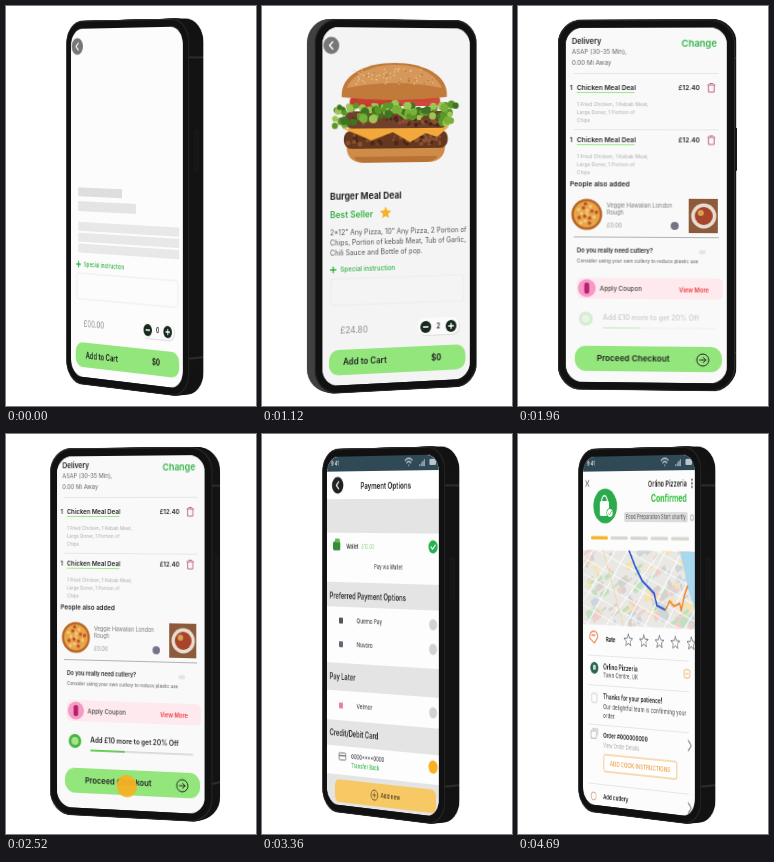
These frames come from a looping animation (250x400 px, 4760 ms). An HTML page:

```html
<!DOCTYPE html>
<html lang="en">
<head>
<meta charset="utf-8">
<title>Food ordering phone</title>
<style>
html, body { margin: 0; width: 100%; height: 100%; overflow: hidden; background: #fff; }
#stage { position: relative; width: 250px; height: 400px; overflow: hidden; perspective: 2600px; perspective-origin: 129px 75px; }
#phone { position: absolute; left: 40.5px; top: 14px; width: 177px; height: 369px; transform-style: preserve-3d; }
.slice, .key { position: absolute; }
.slice { inset: 0; border-radius: 24px; background:
  linear-gradient(#2c2c2c, #2c2c2c) right 37px / 6px 2px no-repeat,
  linear-gradient(#2c2c2c, #2c2c2c) right 330px / 6px 2px no-repeat,
  linear-gradient(90deg, #404040 8%, #121212 92%); }
.slice.front { background: #111; box-shadow: inset 0 0 0 1px #2c2c2c; }
.key { right: -1px; top: 108px; width: 4px; height: 42px; background: #161616; }
#screen { position: absolute; left: 8px; top: 8px; width: 161px; height: 353px; border-radius: 17px; overflow: hidden; background: #fcfcfc; transform: translateZ(13.6px); }
svg { display: block; font-family: Inter, sans-serif; }
</style>
</head>
<body>
<div id="stage"><div id="phone"></div></div>
<script>
const LOOP = 4760, STEP = 70;
const GREEN = '#2fb344', LIME = '#92e67b', ORANGE = '#f9b022', GREY = '#9a9a9a', INK = '#242424';

// Text is placed by its vertical centre.
const text = (x, y, size, s, fill = INK, weight = 400, anchor = 'start', id = '') =>
  `<text id="${id}" x="${x}" y="${y + size * .35}" font-size="${size}" fill="${fill}" font-weight="${weight}" text-anchor="${anchor}">${s}</text>`;
const rect = (x, y, w, h, fill, r = 0, more = '') =>
  `<rect x="${x}" y="${y}" width="${w}" height="${h}" rx="${r}" fill="${fill}" ${more}/>`;
const disc = (x, y, r, fill, more = '') => `<circle cx="${x}" cy="${y}" r="${r}" fill="${fill}" ${more}/>`;
const shape = (d, fill) => `<path d="${d}" fill="${fill}"/>`;
const line = (d, stroke, w = 1) =>
  `<path d="${d}" fill="none" stroke="${stroke}" stroke-width="${w}" stroke-linecap="round" stroke-linejoin="round"/>`;
const rule = (y, x = 8, w = 145) => rect(x, y, w, .8, '#e2e2e2');
const plus = (x, y, r, color, w = 1) => line(`M${x - r} ${y}h${2 * r}M${x} ${y - r}v${2 * r}`, color, w);
const group = (id, body) => `<g id="${id}">${body}</g>`;
const each = (n, f) => Array.from({ length: n }, (_, i) => f(i)).join('');

function star(x, y, r) {
  return 'M' + Array.from({ length: 10 }, (_, i) => {
    const a = i * Math.PI / 5, d = i % 2 ? r * .45 : r;
    return `${(x + d * Math.sin(a)).toFixed(1)} ${(y - d * Math.cos(a)).toFixed(1)}`;
  }).join('L') + 'Z';
}

let seed = 7;
const rnd = () => (seed = seed * 16807 % 2147483647) / 2147483647;

function backButton(x, y, r, fill) {
  return disc(x, y, r, fill) + line(`M${x + 1.5} ${y - 3.5}l-3.5 3.5l3.5 3.5`, '#fff', 1.5);
}

function burger() {
  const greens = ['#5d9628', '#79b038', '#3f7420', '#9cc653'];
  const crumbs = (y, n) => each(n, () => disc(30 + rnd() * 99, y + rnd() * 10, 1 + rnd() * 1.5, rnd() < .5 ? '#8a5232' : '#4b2618'));
  const leaves = each(90, i => {
    const x = 17 + rnd() * 125, side = Math.abs(x - 79) / 62;
    return disc(x, 76 + rnd() * (10 + 13 * side), 2.5 + rnd() * 2, greens[i % 4]);
  });
  return '<g transform="translate(-4.700 0) scale(1.060 1)">' +
    shape('M29 114H130Q132 134 112 134H47Q27 134 29 114Z', '#cf8c48') +
    shape('M36 128H123Q118 134 110 134H48Q40 134 36 128Z', '#b87234') +
    rect(26, 102, 107, 18, '#66371f', 8) + crumbs(106, 50) +
    shape('M25 100L134 99L122 109L110 105L94 114L76 104L54 112L40 106Z', '#f2a93a') +
    rect(27, 83, 106, 17, '#70402a', 7) + crumbs(87, 50) +
    rect(32, 69, 46, 10, '#c43a2c', 4) + rect(80, 68, 45, 10, '#d2483a', 4) + leaves +
    rect(40, 70, 30, 5, '#c93e30', 2) + rect(84, 69, 34, 5, '#d04536', 2) +
    shape('M24 69C22 48 46 35 78 35S134 48 132 69Q78 75 24 69Z', '#c27a3a') +
    shape('M29 60C36 44 58 37 78 37S118 42 127 60Q78 50 29 60Z', '#d6985a') +
    each(70, () => disc(36 + rnd() * 84, 41 + rnd() * 16, .7, rnd() < .7 ? '#eccf9c' : '#b06f34')) + '</g>';
}

function product() {
  const details = rect(0, 0, 161, 353, '#f4f4f4') + burger() +
    text(8, 167, 9.3, 'Burger Meal Deal', INK, 700) +
    text(8, 185, 9, 'Best Seller', GREEN, 600) +
    shape(star(68, 184, 6.5), ORANGE) +
    ['2*12" Any Pizza, 10" Any Pizza, 2 Portion of', 'Chips, Portion of kebab Meat, Tub of Garlic,', 'Chili Sauce and Bottle of pop.']
      .map((s, i) => text(8, 202.500 + i * 10, 7.2, s, '#555')).join('');
  const skeleton = rect(11, 161, 64, 9, '#dedede') + rect(11, 175, 84, 10, '#e4e4e4') +
    each(3, i => rect(11, 196 + i * 11, 145, 9, '#e8e8e8'));
  return group('details', details) + group('skeleton', skeleton) + backButton(9.5, 18, 8.5, '#777') +
    plus(11.5, 239, 2.8, GREEN, 1.4) + text(19, 239, 6.7, 'Special instruction', GREEN, 500) +
    rect(9, 248, 145, 26, 'none', 2, 'stroke="#ebebeb"') +
    text(19, 298.500, 8.8, '', GREY, 500, 'start', 'price') +
    rect(104, 291, 46, 17, '#dedede', 8) + rect(103, 290, 46, 17, '#fbfbfb', 8) +
    disc(112, 299, 6, '#16291c') + line('M109.500 299h5', '#fff', 1.3) +
    disc(140, 299, 6, '#16291c') + plus(140, 299, 2.6, '#fff', 1.3) +
    text(126, 299, 7, '', INK, 600, 'middle', 'count') +
    rect(7, 318, 149, 25, LIME, 10) + text(22, 330.500, 8.6, 'Add to Cart', INK, 600) + text(118, 330.500, 8.4, '$0', INK, 700);
}

function basketItem(y) {
  return text(4, y, 6.4, '1', INK, 600) + text(11, y, 6.6, 'Chicken Meal Deal', INK, 600) +
    rect(11, y + 4, 58, .9, LIME) + text(134, y, 6.4, '£12.40', INK, 600, 'end') +
    line(`M142 ${y - 3}h7M144 ${y - 4.500}h3M142.700 ${y - 3}v7h5.600v-7`, '#c4667c') +
    ['1 Fried Chicken, 1 Kebab Meat,', 'Large Doner, 1 Portion of', 'Chips'].map((s, i) => text(11, y + 16 + i * 8, 5, s, '#aaa')).join('');
}

function basket() {
  const pizza = disc(21, 186, 15.5, '#b86526') + disc(21, 186, 13, '#e6a548') +
    each(16, i => disc(21 + 11 * Math.cos(i * 2.4) * Math.sqrt(i / 16), 186 + 11 * Math.sin(i * 2.4) * Math.sqrt(i / 16), 1.8, i % 2 ? '#c4512a' : '#f0c878'));
  const bowl = rect(123, 170, 29, 34, '#8d5a3c') + disc(138, 187, 12.5, '#e6ded2') + disc(138, 187, 9, '#a8442c') + disc(135, 184, 3, '#d8a150');
  return rect(0, 0, 161, 360, '#f9f9f9') +
    text(6, 13, 7.4, 'Delivery', INK, 600) + text(6, 24, 6.2, 'ASAP (30-35 Min),', '#666') + text(6, 35, 6.2, '0.00 Mi Away', '#666') +
    text(151, 16, 9.4, 'Change', GREEN, 600, 'end') + rule(45) +
    basketItem(60) + rule(101) + basketItem(112) +
    text(4, 156, 6.8, 'People also added', INK, 600) + pizza + bowl +
    text(41, 177, 5.6, 'Veggie Hawaiian London', '#777') + text(41, 184.500, 5.6, 'Rough', '#777') + text(41, 197, 5.6, '£0.00', GREY) +
    disc(109, 197, 4, '#737487') + rect(8, 208, 145, .9, '#aaa') +
    text(11, 222, 5.8, 'Do you really need cutlery?', INK, 600) + rect(133, 221, 7, 4, '#e4e4e4', 2) +
    text(11, 232, 4.8, 'Consider using your own cutlery to reduce plastic use', '#555') +
    rect(11, 249, 146, 21, '#fde9ee', 5) + disc(21, 259.500, 9, '#f59ac4') + rect(18.500, 254, 5, 11, '#b8206c', 2) +
    text(34, 259.500, 6.2, 'Apply Coupon', '#444', 500) + text(143, 260.500, 5.8, 'View More', '#ec3b3b', 600, 'end') +
    group('offer', disc(20, 290, 7, '#48b53c') + disc(20, 290, 4, '#a6e292') +
      text(37, 289, 6.9, 'Add £10 more to get 20% Off', INK, 600) + rect(37, 298, 112, 1.8, '#d8d8d8', 1) + rect(37, 298, 38, 1.8, '#5cc94a', 1)) +
    rect(9, 317, 147, 25, LIME, 11) + text(31, 329.500, 8.2, 'Proceed Checkout', INK, 600) +
    disc(137, 330, 6, 'none', `stroke="${INK}"`) + line('M134 330h6m-2.500 -2.500l2.500 2.500l-2.500 2.500', INK);
}

function statusBar() {
  return rect(0, 0, 161, 15, '#304957') + text(6, 7, 6, '9:41', '#fff', 500) +
    line('M114 5q5 -4 10 0M116 7.500q3 -2.500 6 0M118.800 10h.4', '#b9c6ce', 1.3) +
    each(4, i => rect(134 + i * 2.2, 9 - i * 1.6, 1.3, 2 + i * 1.6, '#b9c6ce')) + rect(148, 4, 9, 6, '#b9c6ce', 1.5);
}

function method(y, name, mark) {
  return rect(18, y - 3, 6, 6, mark, 1) + text(44, y, 6.8, name, '#444', 500) + disc(153, y, 5.500, '#d2d2d2');
}

function payment() {
  const head = (y, s) => text(4, y, 8.500, s, '#333', 600);
  return rect(0, 0, 161, 353, '#e4e4e4') + rect(0, 0, 161, 43, '#fff') + statusBar() +
    backButton(16, 29, 8.5, '#222') + text(86, 30, 8.800, 'Payment Options', INK, 600, 'middle') +
    rect(0, 77, 161, 50, '#fdfdfd') + rect(9, 86, 11, 9, '#348d37', 2) + rect(12, 83, 7, 4, '#62b84c', 1) +
    text(29, 90.500, 6, 'Wallet', INK, 500) + text(51, 90.500, 6, '£10.00', '#8bd97a') +
    disc(153, 90, 6.5, '#26b153') + line('M150 90l2.200 2.200l4 -4', '#fff', 1.3) + text(90, 111, 6.1, 'Pay via Wallet', '#444', 500, 'middle') +
    head(141, 'Preferred Payment Options') + rect(0, 152, 161, 57, '#fdfdfd') +
    method(166, 'Quemo Pay', '#555') + method(190, 'Nuvoro', '#667') +
    head(223, 'Pay Later') + rect(0, 237, 161, 30, '#fdfdfd') + method(252, 'Velmor', '#ef7fa0') +
    head(280, 'Credit/Debit Card') + rect(0, 293, 161, 29, '#fdfdfd') +
    rect(18, 300, 10, 7, 'none', 1, 'stroke="#777"') + rect(18, 302, 10, 1.4, '#777') +
    text(36, 303, 6.2, '0000****0000', '#444', 500) + text(36, 312, 6.2, 'Transfer Back', GREEN, 500) + disc(153, 305, 6.5, ORANGE) +
    rect(12, 327, 145, 23, '#f7c965', 6) + disc(70, 339, 5, 'none', 'stroke="#6b5525"') + plus(70, 339, 2.4, '#6b5525') +
    text(79, 339, 6.6, 'Add new', '#453617', 500);
}

function map() {
  const tints = ['#efcfca', '#c4dfc0', '#f3e4b0', '#cdd6e0', '#d6d3cf'];
  const blocks = each(130, i => rect(0, 0, 3 + rnd() * 12, 2 + rnd() * 7, tints[i % 5], 1,
    `transform="translate(${rnd() * 160} ${rnd() * 74}) rotate(-28)"`));
  const roads = each(9, i => line(`M${i * 28 - 50} 76l${55 + rnd() * 30} -80`, '#fafafa', 1.4) + line(`M0 ${i * 16 - 40}l161 60`, '#fafafa', 1.1));
  return `<svg x="0" y="94.500" width="161" height="76">${rect(0, 0, 161, 76, '#e9e8e4')}${blocks}${roads}` +
    line('M30 0l30 76', '#ecd9a0', 1.2) +
    shape('M140 0L161 0V56Q150 36 147 20Z', '#a9d7ee') +
    line('M68 0L77 16L87 30L104 42L108 54L120 58', '#3358d8', 2.2) +
    line('M120 58L126 49L132 54L140 51L142 58L147 42L151 34', '#f08b2c', 2) + '</svg>';
}

function confirmed() {
  const chevron = y => line(`M152 ${y - 5}l4 5l-4 5`, '#888', 1.3);
  return statusBar() + line('M4 24l5 6m0 -6l-5 6', '#444') +
    text(150, 28, 7.8, 'Orlino Pizzeria', INK, 600, 'end') + each(3, i => disc(157, 24.500 + i * 3.5, .9, INK)) +
    disc(33, 50, 17.5, '#2bab4c') + rect(25, 45, 14, 15, '#fff', 2) + line('M28 45v-2q4 -7 8 0v2', '#fff', 1.5) +
    disc(40, 57, 5, '#2bab4c') + disc(40, 57, 4, '#fff') + line('M38 57l1.500 1.500l3 -3', '#2bab4c') +
    text(150, 43, 9.7, 'Confirmed', '#31bf3d', 700, 'end') +
    rect(61, 56, 90, 10, '#dcdcdc', 2) + text(106, 61, 6, 'Food Preparation Start shortly', '#555', 400, 'middle') +
    rect(155, 59, 4, 5, 'none', 1, 'stroke="#999"') +
    each(5, i => rect(12 + i * 29, 80.500, 25, 3.2, i ? '#d9d5cf' : ORANGE, 1.5)) + map() +
    line('M10 184q0 -7 6 -7t6 6l-5 6zM13 181h5', '#ee8a55', 1.4) + text(34, 184.500, 6.5, 'Rate', INK, 700) +
    each(5, i => line(star(67 + i * 22.3, 184.500, 6.5), '#666', .9)) + rule(201) +
    disc(17, 214, 6, '#2c6650') + rect(15, 211, 4, 5, '#c5ddd2', 1) +
    text(30, 212, 7.2, 'Orlino Pizzeria', INK, 600) + text(30, 221, 6.4, 'Town Centre, UK', '#444') +
    rect(146, 210, 8, 8, 'none', 2, 'stroke="#f0b068"') + line('M148 214h4', '#f0b068') + rule(231) +
    rect(13, 240, 8, 9, 'none', 1, 'stroke="#ccc"') +
    text(30, 243, 6.9, 'Thanks for your patience!', INK, 600) +
    text(30, 252.500, 6.7, 'Our delightful team is confirming your', '#444') + text(30, 261.500, 6.7, 'order.', '#444') + rule(271) +
    line('M12 285v-7h8v7zM14 276h8v6', '#aaa', .9) +
    text(30, 282, 6.8, 'Order #000000000', INK, 600) + text(30, 292, 6, 'View Order Details', '#aaa') + chevron(284) +
    rect(31, 301, 105, 17, '#fff', 2, 'stroke="#f3b871"') + text(83.500, 309.500, 6.6, 'ADD COOK INSTRUCTIONS', '#ee9b3c', 500, 'middle') +
    rule(331) + disc(16, 344, 4, 'none', 'stroke="#d9a27b"') + text(30, 344, 6.6, 'Add cutlery', INK, 600) + chevron(345);
}

const phone = document.getElementById('phone');
phone.innerHTML = each(21, i =>
  `<div class="slice ${i === 20 ? 'front' : ''}" style="transform:translateZ(${i - 7}px)">${i > 6 && i < 14 ? '<div class="key"></div>' : ''}</div>`) +
  `<div id="screen"><svg width="161" height="353">${group('product', product())}${group('basket', basket())}` +
  `${group('payment', payment())}${group('confirmed', confirmed())}<circle id="tap" fill="${ORANGE}" opacity=".92"/></svg></div>`;

const el = id => document.getElementById(id);
const clamp = x => Math.min(1, Math.max(0, x));
const ramp = (t, a, b) => clamp((t - a) / (b - a));
const pages = [['product', 0], ['basket', 1470], ['payment', 2660], ['confirmed', 3850]];
const taps = [[420, 560, 141, 299, 6.5], [770, 910, 141, 299, 6.5], [1330, 1470, 77, 329, 11], [2450, 2660, 77, 329, 11]];

function angle(t) {
  if (t < 490) return -46 + 94 * (1 - Math.cos(Math.PI * t / 490)) / 2;
  return 48 - 94 * (1 - Math.pow(1 - ramp(t, 490, 3360), 1.18));
}

function draw(t) {
  phone.style.transform = `rotateY(${angle(t)}deg)`;
  pages.forEach(([id, start], i) => {
    const end = i + 1 < pages.length ? pages[i + 1][1] : LOOP;
    el(id).style.display = t >= start && t < end ? '' : 'none';
  });
  const loaded = ramp(t, 0, 280);
  el('details').style.opacity = loaded;
  el('skeleton').style.opacity = 1 - loaded;
  const count = t < 420 ? 0 : t < 840 ? 1 : 2;
  el('count').textContent = count;
  el('price').textContent = '£' + (count * 12.4).toFixed(2).padStart(5, '0');
  el('basket').setAttribute('transform', `translate(0 ${-4 * ramp(t, 2030, 2380)})`);
  el('offer').style.opacity = ramp(t, 1890, 2240);
  const tap = taps.find(([a, b]) => t >= a && t < b);
  el('tap').style.display = tap ? '' : 'none';
  if (tap) ['cx', 'cy', 'r'].forEach((k, i) => el('tap').setAttribute(k, tap[i + 2]));
}

function loop() {
  const t = performance.now() % LOOP;
  draw(Math.floor(t / STEP) * STEP);
  requestAnimationFrame(loop);
}
loop();
</script>
</body>
</html>
```
